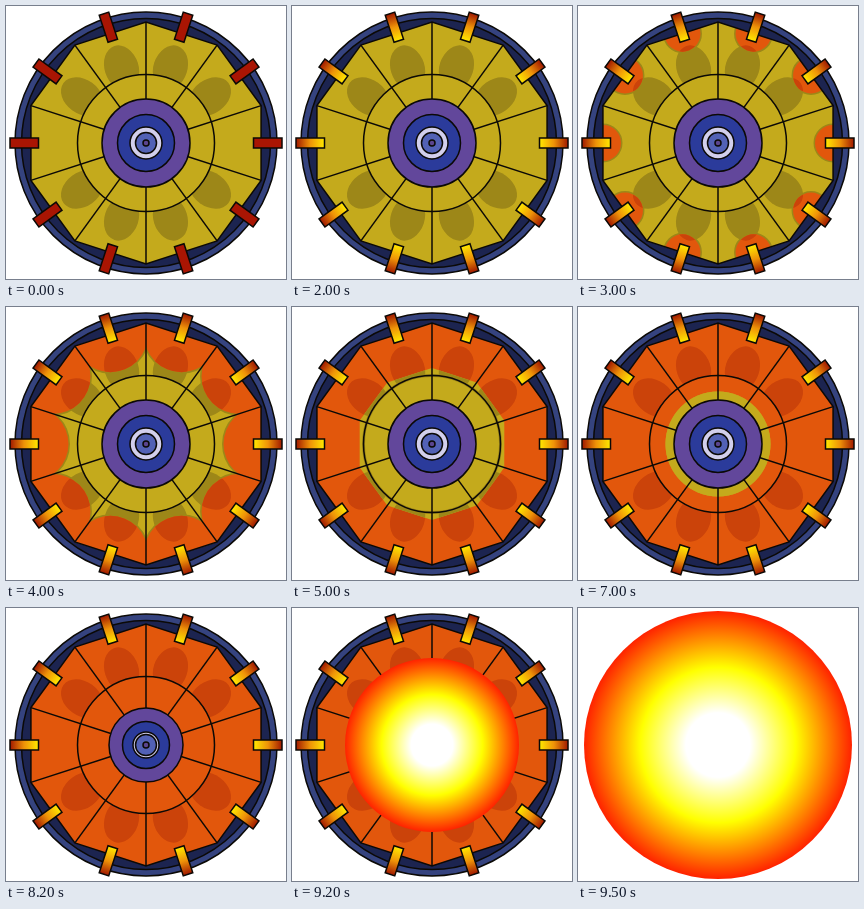
An HTML page with a canvas that plays this animation: 280x273 px, repeating every 10 s.

```html
<!DOCTYPE html>
<html lang="en">
<head>
<meta charset="utf-8">
<style>
html, body { margin: 0; width: 100%; height: 100%; overflow: hidden; background: #fff; }
canvas { display: block; }
</style>
</head>
<body>
<canvas id="stage" width="280" height="273"></canvas>
<script>
const ctx = document.getElementById('stage').getContext('2d');
const LOOP = 10000, TAU = Math.PI * 2, SECTOR = TAU / 10, HALF = SECTOR / 2;
const VERTEX = 121, CHARGE = 68.5, WAVE_ORIGIN = 115;
const INK = '#0b0906', YELLOW = '#c4aa1c', OLIVE = '#9d8718', ORANGE = '#e2570c', RUST = '#cb430a';

// Each step holds until the next: lens wave, ring front, core size or flash.
const steps = [
  { at: 0, cold: true },
  { at: 2000 },
  { at: 2500, wave: 9 },
  { at: 3000, wave: 18 },
  { at: 3500, wave: 27.5 },
  { at: 4000, wave: 37.5 },
  { at: 4500, tip: 88, valley: 75 },
  { at: 5000, tip: 76, valley: 72.3 },
  { at: 5500, front: 69.5 },
  { at: 6000, front: 63.5 },
  { at: 6500, front: 58 },
  { at: 7000, front: 52.5 },
  { at: 7400, front: 48 },
  { at: 7800, front: 44 },
  { at: 8200, front: 0, core: [37, 23.5, 13, 10.5, 3] },
  { at: 8600, front: 0, core: [31.5, 18.5, 10, 9, 2.5] },
  { at: 8900, front: 0, core: [26, 14, 7, 6.5, 2] },
  { at: 9200, front: 0, core: [26, 14, 7, 6.5, 2], flash: 87 },
  { at: 9500, flash: 134, alone: true }
];
const restCore = [44, 28.5, 16, 10.5, 3];
const coreColors = ['#62479b', '#2b3b9b', '#d2cfec', '#5261b5', '#5b458f'];

const polar = (r, a) => [r * Math.cos(a), r * Math.sin(a)];

function disc(r, fill, stroke = INK, width = 1.5) {
  ctx.beginPath();
  ctx.arc(0, 0, r, 0, TAU);
  if (fill) { ctx.fillStyle = fill; ctx.fill(); }
  if (stroke) { ctx.strokeStyle = stroke; ctx.lineWidth = width; ctx.stroke(); }
}

function eachSector(draw) {
  for (let i = 0; i < 10; i++) {
    ctx.save();
    ctx.rotate(i * SECTOR);
    draw(i);
    ctx.restore();
  }
}

function decagon(tip, valley = tip * Math.cos(HALF)) {
  const control = 2 * valley - tip * Math.cos(HALF);
  ctx.beginPath();
  ctx.moveTo(...polar(tip, -HALF));
  for (let i = 0; i < 10; i++) {
    const a = i * SECTOR;
    ctx.quadraticCurveTo(...polar(control, a), ...polar(tip, a + HALF));
  }
  ctx.closePath();
}

function explosive(base, petal) {
  ctx.fillStyle = base;
  ctx.fillRect(-140, -140, 280, 280);
  eachSector(i => {
    if (i % 5 === 0) return;
    ctx.beginPath();
    ctx.ellipse(79, 0, 23, 17, 0, 0, TAU);
    ctx.fillStyle = petal;
    ctx.fill();
  });
  disc(CHARGE, base, null);
}

function burnWaves(radius) {
  const waves = new Path2D();
  for (let i = 0; i < 10; i++) {
    const [x, y] = polar(WAVE_ORIGIN, i * SECTOR);
    waves.moveTo(x + radius, y);
    waves.arc(x, y, radius, 0, TAU);
  }
  ctx.strokeStyle = OLIVE;
  ctx.lineWidth = 3;
  ctx.stroke(waves);
  ctx.save();
  ctx.clip(waves);
  explosive(ORANGE, RUST);
  ctx.restore();
}

function unburnt(step) {
  ctx.save();
  if (step.tip) decagon(step.tip, step.valley);
  else { ctx.beginPath(); ctx.arc(0, 0, step.front, 0, TAU); }
  ctx.clip();
  explosive(YELLOW, OLIVE);
  ctx.strokeStyle = OLIVE;
  ctx.lineWidth = 3;
  ctx.stroke();
  ctx.restore();
}

function lenses(step) {
  ctx.save();
  decagon(VERTEX);
  ctx.clip();
  if (step.tip || step.front !== undefined) {
    explosive(ORANGE, RUST);
    if (step.front !== 0) unburnt(step);
  } else {
    explosive(YELLOW, OLIVE);
    if (step.wave) burnWaves(step.wave);
  }
  ctx.restore();

  ctx.strokeStyle = INK;
  ctx.lineWidth = 1.5;
  decagon(VERTEX);
  ctx.stroke();
  eachSector(() => {
    ctx.beginPath();
    ctx.moveTo(...polar(20, HALF));
    ctx.lineTo(...polar(VERTEX, HALF));
    ctx.stroke();
  });
  disc(CHARGE, null);
}

function detonators(cold) {
  const heat = ctx.createLinearGradient(136, 0, 108, 0);
  heat.addColorStop(0, '#a01800');
  heat.addColorStop(0.5, '#ee9208');
  heat.addColorStop(1, '#ffe600');
  eachSector(() => {
    ctx.fillStyle = cold ? '#a91503' : heat;
    ctx.fillRect(107.5, -5, 28.5, 10);
    ctx.strokeStyle = INK;
    ctx.lineWidth = 1.5;
    ctx.strokeRect(107.5, -5, 28.5, 10);
  });
}

function fireball(r) {
  const glow = ctx.createRadialGradient(0, 0, 0, 0, 0, r);
  glow.addColorStop(0, '#fff');
  glow.addColorStop(0.24, '#fff');
  glow.addColorStop(0.58, '#ff0');
  glow.addColorStop(1, '#f20');
  disc(r, glow, null);
}

function draw(step) {
  ctx.setTransform(1, 0, 0, 1, 0, 0);
  ctx.fillStyle = '#fff';
  ctx.fillRect(0, 0, 280, 273);
  ctx.translate(140, 137);
  if (!step.alone) {
    disc(131, '#35437f');
    disc(124.5, '#1c2450');
    lenses(step);
    (step.core || restCore).forEach((r, i) => disc(r, coreColors[i]));
    detonators(step.cold);
  }
  if (step.flash) fireball(step.flash);
}

function tick() {
  const t = performance.now() % LOOP;
  draw(steps.findLast(s => s.at <= t));
  requestAnimationFrame(tick);
}
tick();
</script>
</body>
</html>
```
